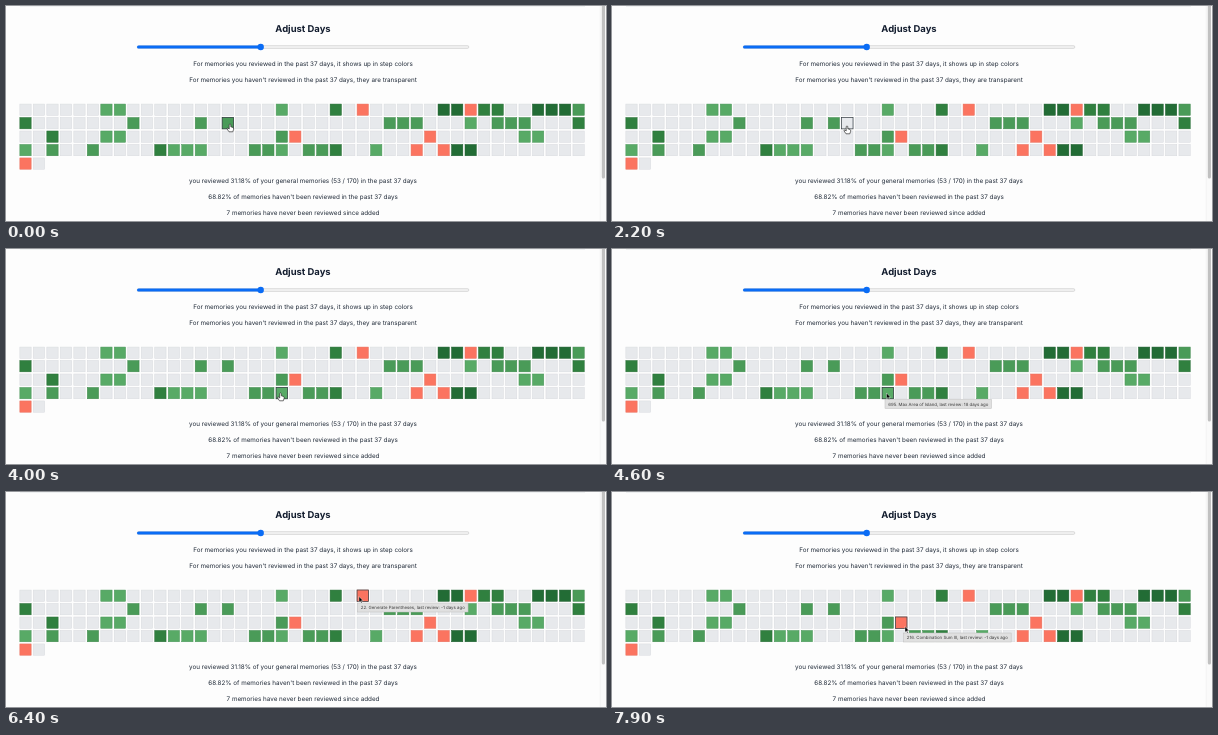
An HTML page that plays this animation: 600x215 px, repeating every 8 s.

```html
<!DOCTYPE html>
<html lang="en">
<head>
<meta charset="utf-8">
<title>Adjust Days</title>
<style>
  html, body { margin: 0; width: 100%; height: 100%; overflow: hidden; background: #fdfdfd; }
  svg { display: block; width: 600px; height: 215px; }
  text { font-family: Inter, sans-serif; font-size: 6.3px; fill: #1f2937; text-rendering: geometricPrecision; }
  .line { text-anchor: middle; }
  .title { font-size: 9.45px; font-weight: 700; fill: #111b2d; }
  #tip text { font-size: 4.35px; fill: #3a3a3a; }
</style>
</head>
<body>
<svg id="stage" viewBox="0 0 600 215">
  <path d="M14 .3H579" stroke="#e3e5e8" stroke-width=".7"/>
  <rect x="594" width="6" height="215" fill="#fafafa"/>
  <path d="M594.2 0V215" stroke="#e8e8e8" stroke-width=".4"/>
  <rect x="595.8" y="-4" width="3.2" height="176.5" rx="1.6" fill="#c1c1c1"/>

  <rect x="131.2" y="39.6" width="331.6" height="2.9" rx="1.4" fill="#efefef" stroke="#b9b9b9" stroke-width=".4"/>
  <rect x="131" y="39.4" width="124" height="3.2" rx="1.6" fill="#0a6cf5"/>
  <circle cx="254.7" cy="41" r="3.2" fill="#0a6cf5"/>

  <g id="cells"></g>
  <rect id="hover" width="11.4" height="11.4" fill="none" stroke="#333b40" stroke-width=".7"/>
  <g id="tip">
    <rect height="9" fill="#e0e0e0" stroke="#bdbdbd" stroke-width=".5"/>
    <text x="3.3" y="6.1"></text>
  </g>
  <path id="hand" d="M-.8 .5Q0 -.6 .8 .5V2.8L3 3.4Q3.9 3.8 3.6 5.4L2.8 7.8H-1L-3 4.8Q-3 3.7 -2 4.1L-.8 5Z"
        fill="#fff" stroke="#222" stroke-width=".65" stroke-linejoin="round"/>
  <path id="arrow" d="M0 0V5.8L1.3 4.6L2.2 6.6L3.1 6.2L2.2 4.3H4.1Z"
        fill="#000" stroke="#fff" stroke-width=".4" stroke-linejoin="round"/>
</svg>
<script>
const DURATION = 8000, STEP = 100;
const GRID = { x: 13.6, y: 97.8, dx: 13.49, dy: 13.47, size: 11.8, columns: 42, total: 170 };
const FILL = { '.': '#e7e9ec', L: '#58aa66', M: '#4a9b58', D: '#30803f', X: '#226c35', R: '#fb7460' };
const EDGE = { '.': '#d8dade', L: '#4a955a', M: '#3e874c', D: '#286d37', X: '#1c5c2d', R: '#e6705e' };
const ROWS = [
  '......LL...........L...D.R.....XXRDD..XXXM',
  'D.......M....M.M...........MMM...L.MMM...D',
  '..D...LL...........MR.........R......LL...',
  'L.M..M....DLLL...MML.MMD..L..R.RXX........',
  'R.'
];
const LINES = [
  [25.5, 'Adjust Days', 'line title'],
  [60.3, 'For memories you reviewed in the past 37 days, it shows up in step colors'],
  [76.2, "For memories you haven't reviewed in the past 37 days, they are transparent"],
  [177.3, 'you reviewed 31.18% of your general memories (53 / 170) in the past 37 days'],
  [193.2, "68.82% of memories haven't been reviewed in the past 37 days"],
  [209.2, '7 memories have never been reviewed since added']
];
// Pointer path: time, x, y
const PATH = [
  [0, 224, 118], [200, 235, 120], [2200, 235, 120], [2450, 258, 162], [2700, 276, 127],
  [3700, 276, 127], [4000, 274.5, 144], [4650, 274.5, 144], [5400, 353, 104.5],
  [6450, 353, 104.5], [6800, 293, 134.5], [8000, 293, 134.5]
];
// Tooltips: start, end, text
const TIPS = [
  [2900, 3800, '216. Combination Sum III, last review: 17 days ago'],
  [4500, 4700, '695. Max Area of Island, last review: 18 days ago'],
  [6000, 6500, '22. Generate Parentheses, last review: -1 days ago'],
  [7200, 8000, '216. Combination Sum III, last review: -1 days ago']
];

const $ = id => document.getElementById(id);
const move = (el, x, y) => el.setAttribute('transform', `translate(${x} ${y})`);
const show = (el, on) => { el.style.display = on ? '' : 'none'; };

function add(parent, tag, attributes, content = '') {
  const el = document.createElementNS('http://www.w3.org/2000/svg', tag);
  for (const key in attributes) el.setAttribute(key, attributes[key]);
  el.textContent = content;
  return parent.appendChild(el);
}

const cellX = column => GRID.x + column * GRID.dx;
const cellY = row => GRID.y + row * GRID.dy;

LINES.forEach(([y, content, name = 'line']) => add($('stage'), 'text', { x: 297, y, class: name }, content));
ROWS.forEach((row, r) => [...row].forEach((kind, c) => add($('cells'), 'rect', {
  x: cellX(c) + .25, y: cellY(r) + .25, width: GRID.size - .5, height: GRID.size - .5,
  fill: FILL[kind], stroke: EDGE[kind], 'stroke-width': .5
})));

function pointerAt(time) {
  const i = Math.max(1, PATH.findIndex(point => point[0] >= time));
  const [t0, x0, y0] = PATH[i - 1], [t1, x1, y1] = PATH[i];
  const u = (time - t0) / (t1 - t0), eased = u * u * (3 - 2 * u);
  return [x0 + (x1 - x0) * eased, y0 + (y1 - y0) * eased];
}

const [tipBox, tipText] = $('tip').children;

function draw(now) {
  const time = Math.floor(now % DURATION / STEP) * STEP;
  const [x, y] = pointerAt(time);
  const column = Math.floor((x - GRID.x) / GRID.dx), row = Math.floor((y - GRID.y) / GRID.dy);
  const onCell = row >= 0 && column >= 0 && column < GRID.columns && row * GRID.columns + column < GRID.total;
  const tip = TIPS.find(([start, end]) => time >= start && time < end);

  show($('hover'), onCell);
  move($('hover'), cellX(column) + .2, cellY(row) + .2);
  show($('tip'), tip);
  if (tip) {
    tipText.textContent = tip[2];
    tipBox.setAttribute('width', tipText.getComputedTextLength() + 6.6);
    move($('tip'), x - 1.5, y + 6.5);
  }
  const useHand = onCell && !tip;
  show($('hand'), useHand);
  show($('arrow'), !useHand);
  move($('hand'), x, y);
  move($('arrow'), x, y);
}

const begin = performance.now();
function tick() {
  draw(performance.now() - begin);
  requestAnimationFrame(tick);
}
tick();
</script>
</body>
</html>
```
